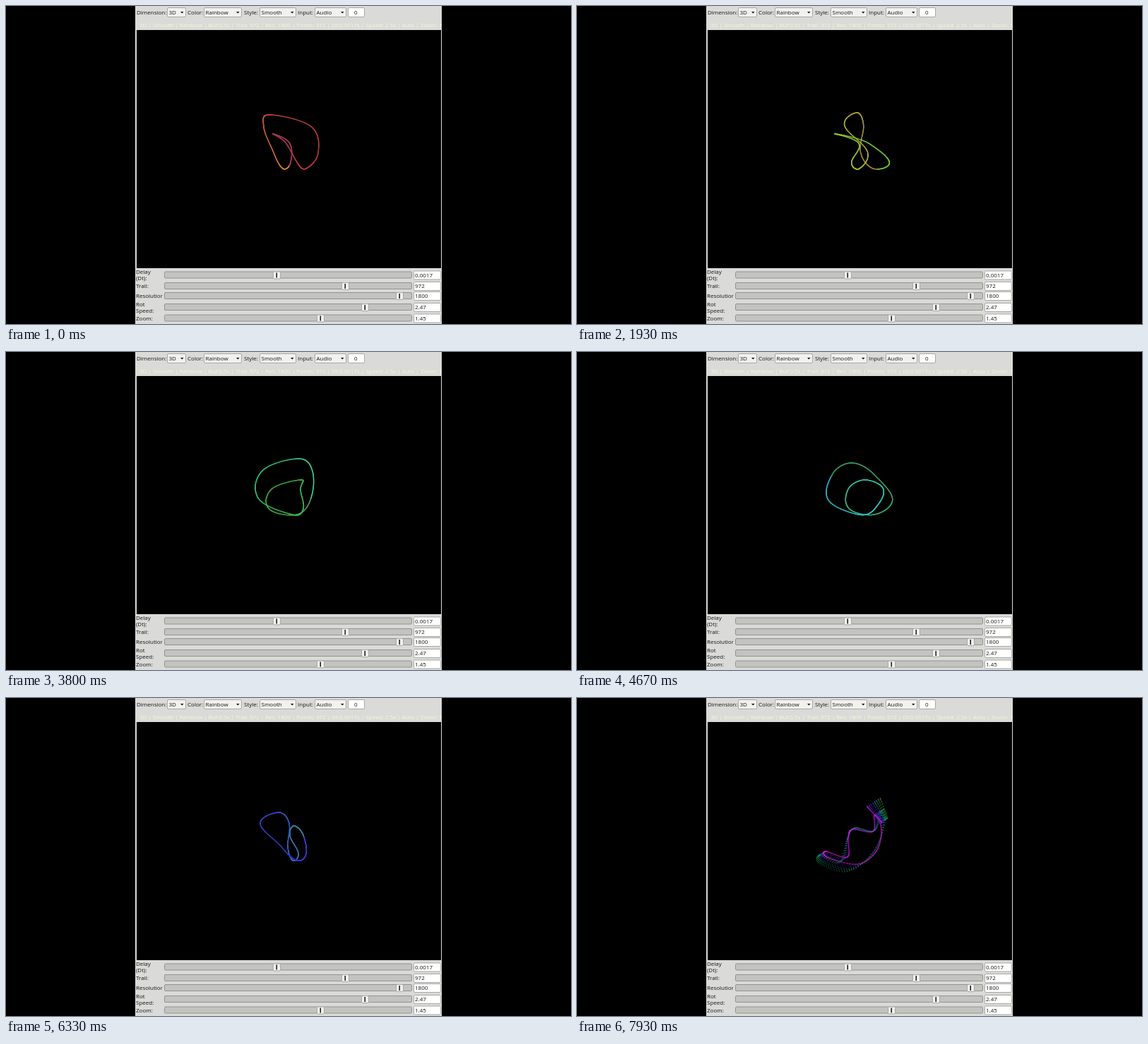
Recreate the animation shown at these times as an HTML page with a canvas. Size 800 by 450 pixels, loop 8 s.

```html
<!DOCTYPE html>
<html lang="en">
<head>
<meta charset="utf-8">
<title>Delay plot</title>
<style>
  html, body { margin: 0; width: 100%; height: 100%; overflow: hidden; background: #000; }
  canvas { display: block; }
</style>
</head>
<body>
<canvas id="stage" width="800" height="450"></canvas>
<script>
const ctx = document.getElementById('stage').getContext('2d');
const FPS = 15, LOOP = 8000, LAST_STEP = 119, POINTS = 972, CENTER = 400;
const PANEL = '#dadad8', LIGHT = '#f1f1ee', EDGE = '#a9a9a5', INK = '#161616';

const mix = (a, b, t) => a + (b - a) * t;

// Smooth closed wave through evenly spaced values, u in turns.
function wave(values) {
  const n = values.length;
  return u => {
    const s = (u - Math.floor(u)) * n, i = Math.floor(s), t = s - i;
    const [a, b, c, d] = [-1, 0, 1, 2].map(k => values[(i + k + n) % n]);
    return b + t / 2 * (c - a + t * (2 * a - 5 * b + 4 * c - d + t * (3 * (b - c) + d - a)));
  };
}

// Two-peak height wave: a high peak at top, a lower one at 181, both troughs at 230.
function heightWave(top) {
  const inner = 181, trough = 230;
  const mean = (top + inner + 2 * trough) / 4;
  const first = (top - inner) / 2, second = (top + inner - 2 * trough) / 4;
  return u => mean + first * Math.cos(2 * Math.PI * u) + second * Math.cos(4 * Math.PI * u);
}

// Key views of the turning curve: x at twelve phases over a height wave.
const poses = [
  [0, heightWave(154), [373, 365, 379, 392, 403, 402, 378, 397, 412, 425, 442, 433]],
  [19, heightWave(152), [396, 367, 402, 408, 404, 407, 363, 423, 430, 431, 433, 420]],
  [39, heightWave(150), [399, 403, 414, 392, 380, 392, 388, 397, 430, 396, 369, 388]],
  [57, heightWave(151), [414, 434, 432, 412, 372, 375, 418, 417, 421, 405, 357, 362]],
  [83, heightWave(163), [370, 396, 434, 418, 406, 402, 393, 431, 411, 393, 380, 383]],
  [95, heightWave(162), [386, 360, 390, 412, 425, 421, 408, 402, 414, 406, 399, 401]],
  [LAST_STEP, wave([154, 176, 166, 189, 186, 198, 225, 217, 226, 235, 215, 180]),
    [411, 431, 421, 419, 390, 384, 383, 352, 356, 398, 425, 430]]
].map(([step, y, xs]) => ({ step, y, x: wave(xs) }));

function drawTrail(step) {
  const next = Math.max(1, poses.findIndex(p => p.step >= step));
  const from = poses[next - 1], to = poses[next];
  const t = (step - from.step) / (to.step - from.step);
  const turn = t * Math.PI / 2;
  const fan = next === poses.length - 1 ? Math.max(0, (t - .55) / .45) : 0;
  const turns = 1 + 6 * fan;
  const seam = .31 - .02 * step;
  const newHue = 30 + 2.35 * step, hueSpan = 60 + 150 * fan;

  function dot(age, u, spread, alpha, size) {
    // Consecutive poses act as the side and front view of a turning shape.
    let x = CENTER + (from.x(u) - CENTER) * Math.cos(turn) + (to.x(u) - CENTER) * Math.sin(turn);
    let y = mix(from.y(u), to.y(u), t);
    // Older turns lean over and stretch.
    x += (195 - y) * .45 * spread;
    y += (y - 195) * .3 * spread;
    const saturation = mix(62, 45, age) + 20 * fan;
    ctx.fillStyle = `hsla(${newHue - hueSpan * age}, ${saturation}%, ${mix(52, 42, age)}%, ${alpha})`;
    ctx.fillRect(x - size / 2, y - size / 2, size, size);
  }

  for (let i = 0; i < POINTS; i++) {
    const age = 1 - i / POINTS;
    dot(age, seam - age * turns, age * fan, mix(.9, .6, fan), mix(1.3, 1.1, fan));
  }
  if (fan) {
    for (let age = 0; age < .15; age += .0004) dot(age, seam - age / .15, 0, .6 * fan, 1.3);
  }
}

function text(str, x, y, color = INK) {
  ctx.fillStyle = color;
  ctx.fillText(str, x, y);
}

function box(x, y, w, h, fill, edge = EDGE) {
  ctx.beginPath();
  ctx.roundRect(x + .5, y + .5, w - 1, h - 1, 1.5);
  ctx.fillStyle = fill;
  ctx.fill();
  ctx.strokeStyle = edge;
  ctx.lineWidth = 1;
  ctx.stroke();
}

function clipped(x, y, w, h, paint) {
  ctx.save();
  ctx.beginPath();
  ctx.rect(x, y, w, h);
  ctx.clip();
  paint();
  ctx.restore();
}

function combo(label, labelX, value, x, w) {
  text(label, labelX, 12);
  box(x, 2, w, 14, LIGHT);
  text(value, x + 2.5, 12);
  ctx.beginPath();
  ctx.moveTo(x + w - 8, 8);
  ctx.lineTo(x + w - 3.5, 8);
  ctx.lineTo(x + w - 5.75, 10.5);
  ctx.fill();
}

function slider(lines, y, thumb, value) {
  clipped(184, 371, 37.5, 79, () =>
    lines.forEach((line, i) => text(line, 184, lines.length > 1 ? y - 1.5 + 9 * i : y + 3)));
  box(224, y - 5, 351, 10, '#c3c3c0', '#92928f');
  box(thumb - 5, y - 5, 11, 11, LIGHT);
  ctx.fillStyle = INK;
  ctx.fillRect(thumb - .5, y - 3, 1.5, 7);
  box(577, y - 6, 39, 13, '#fff');
  text(value, 579, y + 3);
}

function drawWindow() {
  ctx.fillStyle = '#000';
  ctx.fillRect(0, 0, 800, 450);
  ctx.fillStyle = PANEL;
  ctx.fillRect(183, 0, 434, 450);
  ctx.fillStyle = '#000';
  ctx.fillRect(185, 34, 431, 337);
  ctx.font = '8px "Open Sans", "Noto Sans", sans-serif';

  combo('Dimension:', 185, '3D', 228, 27);
  combo('Color:', 257, 'Rainbow', 280, 54);
  combo('Style:', 337, 'Smooth', 359, 52);
  combo('Input:', 413, 'Audio', 437, 45);
  box(484, 2, 24, 14, '#fff');
  text('0', 493, 12);

  clipped(185, 19, 431, 15, () =>
    text('3D | Smooth | Rainbow | Buf:0.5s | Trail: 972 | Res: 1800 | Points: 972 | ' +
      'Dt:0.0017s | Speed: 2.5x | Auto | Zoom: 1.5x', 189, 30, '#f8f8d2'));

  slider(['Delay', '(Dt):'], 380.5, 383, '0.0017');
  slider(['Trail:'], 396, 480, '972');
  slider(['Resolution:'], 410, 557, '1800');
  slider(['Rot', 'Speed:'], 426, 508, '2.47');
  slider(['Zoom:'], 441.5, 445, '1.45');
}

function draw() {
  const time = performance.now() % LOOP;
  drawWindow();
  drawTrail(Math.min(LAST_STEP, Math.floor(time * FPS / 1000 + .1)));
  requestAnimationFrame(draw);
}
draw();
</script>
</body>
</html>
```
